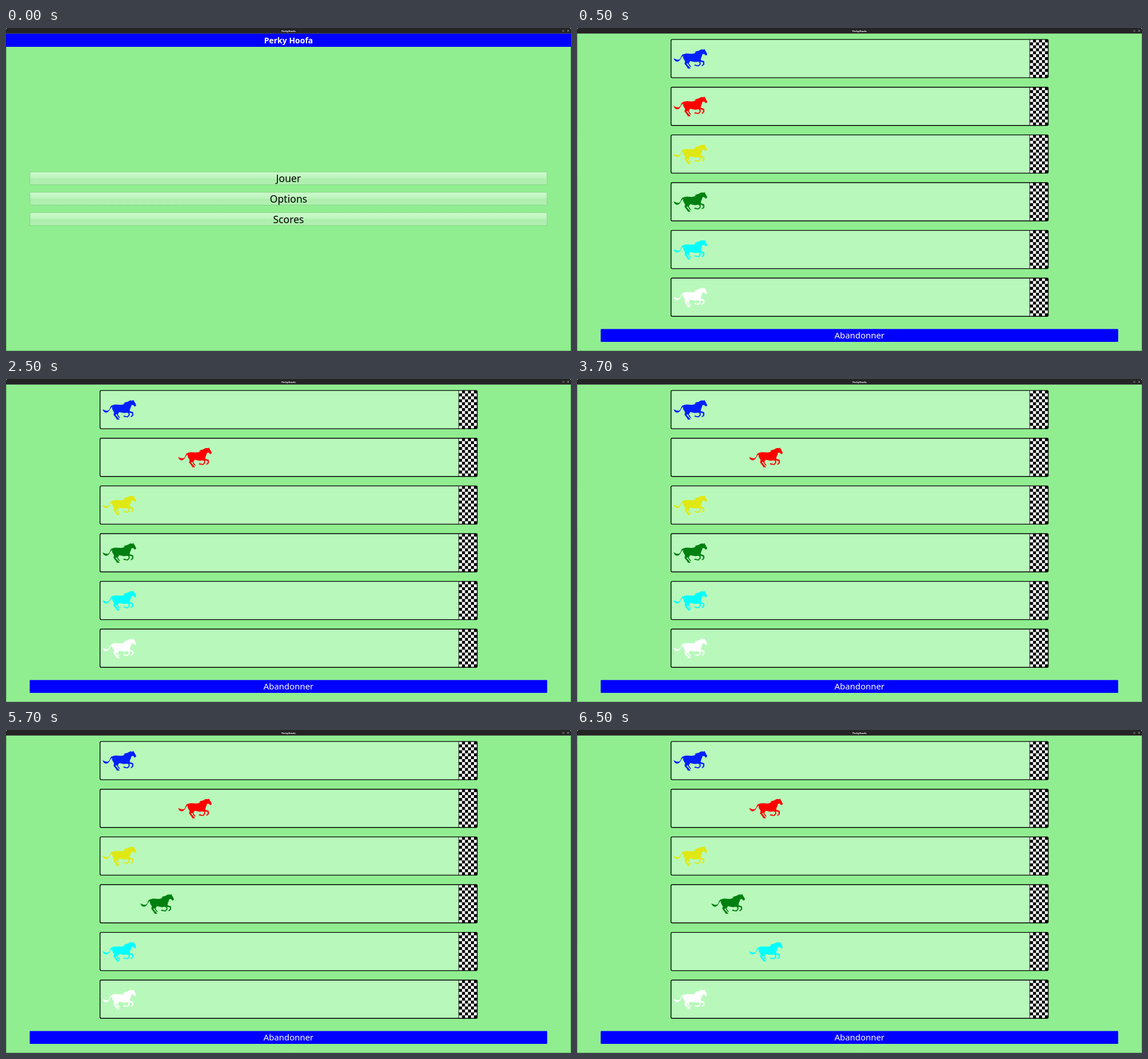
Animation of 989x566 px, one loop 8 s. Source, as an HTML page with a canvas:

```html
<!DOCTYPE html>
<html lang="fr">
<head>
<meta charset="utf-8">
<title>PerkyHoofa</title>
<style>
html, body { margin: 0; width: 100%; height: 100%; overflow: hidden; background: #90ee90; }
canvas { display: block; width: 989px; height: 566px; }
</style>
</head>
<body>
<canvas id="stage"></canvas>
<script>
const W = 989, H = 566, LOOP = 8000, RACE_START = 500;
const LANE_GAP = 83.62, STEP = 66.1;
const canvas = document.getElementById('stage');
const ctx = canvas.getContext('2d');
const dpr = window.devicePixelRatio || 1;
canvas.width = W * dpr;
canvas.height = H * dpr;

const horses = [
  { color: '#0020ff' },
  { color: '#ff0000', at: 2500, steps: 2 },
  { color: '#dfe813' },
  { color: '#008010', at: 4500, steps: 1 },
  { color: '#00ffff', at: 6500, steps: 2 },
  { color: '#ffffff' }
];

const horse = new Path2D(
  // tail, rump and hind legs
  'M18 9.5C13 10 13.5 15 11 18C8.500 20.500 4 19 0 16.700C1 21.500 5 23.800 8.500 22' +
  'C12.500 20 13 14.500 16.500 12.500C16 17 18.500 19.500 20 22L19 26.500L23 31.500L25 35' +
  'L30 34.600L27.500 32.300L22.500 26.500L24.500 25.500L28 31.200L31 32L28.500 29L26.500 25.500L29 21.800' +
  // belly and forelegs
  'C34 23 38 24 42 22.800L45 23.500L45.500 26.500L43 29.200L37 27.800L36 29.600L40 30.500L44 31L47.500 27' +
  'L47 22.700L51.500 24L51.500 27L48.500 30L50.500 30.500L53.800 27.500L53.500 22L47.500 20' +
  // chest, head, mane and back
  'C47.500 16 49.500 14 50.500 9.500L53.500 9.300L56 12L58.500 10.800L58.300 8.300L55.500 3.500L54 .5L52.500 1.500' +
  'L48 1.200L43.500 3.800L39.500 4.600L36.500 6.200L39 6.500L35.500 8.500C29 10 24 7 18 9.500Z'
);

function label(text, y, size, color, weight = 400) {
  ctx.font = `${weight} ${size}px "Noto Sans", "Open Sans", sans-serif`;
  ctx.textAlign = 'center';
  ctx.fillStyle = color;
  ctx.fillText(text, W / 2, y);
}

function box(x, y, w, h, r, fill, stroke, line = 1) {
  ctx.beginPath();
  ctx.roundRect(x, y, w, h, r);
  ctx.fillStyle = fill;
  ctx.fill();
  if (!stroke) return;
  ctx.strokeStyle = stroke;
  ctx.lineWidth = line;
  ctx.stroke();
}

function drawWindow() {
  ctx.fillStyle = '#fff';
  ctx.fillRect(0, 0, W, 10);
  ctx.fillStyle = '#90ee90';
  ctx.fillRect(0, 9.6, W, H);
  box(0, 0, W, 9.7, [2.5, 2.5, 0, 0], '#242424');
  label('PerkyHoofa', 6.5, 4.2, '#fff', 700);
  for (const x of [975.5, 984]) {
    ctx.beginPath();
    ctx.arc(x, 4.9, 2.2, 0, 7);
    ctx.fillStyle = '#444';
    ctx.fill();
  }
  ctx.fillStyle = '#bbb';
  ctx.fillRect(974.7, 5.2, 1.6, 0.6);
  ctx.strokeStyle = '#ddd';
  ctx.lineWidth = 0.5;
  ctx.beginPath();
  ctx.moveTo(983.2, 4.1);
  ctx.lineTo(984.8, 5.7);
  ctx.moveTo(984.8, 4.1);
  ctx.lineTo(983.2, 5.7);
  ctx.stroke();
  ctx.strokeStyle = '#5fa05f';
  ctx.lineWidth = 0.8;
  ctx.beginPath();
  ctx.moveTo(0.4, 10);
  ctx.lineTo(0.4, H - 0.4);
  ctx.lineTo(W - 0.4, H - 0.4);
  ctx.lineTo(W - 0.4, 10);
  ctx.stroke();
}

function menuButton(text, i) {
  const y = 252.3 + i * 35.7;
  const shade = ctx.createLinearGradient(0, y, 0, y + 22.5);
  shade.addColorStop(0, '#d0fcd0');
  shade.addColorStop(0.5, '#b9f3b9');
  shade.addColorStop(0.52, '#aeedae');
  shade.addColorStop(1, '#b0f0b0');
  box(41.9, y, 905.2, 22.4, 1, shade, '#80cc80', 0.8);
  label(text, y + 17.9, 17.6, '#000');
}

function drawMenu() {
  ctx.fillStyle = '#00f';
  ctx.fillRect(0, 9.8, W, 23.2);
  label('Perky Hoofa', 27, 14, '#fff', 700);
  ['Jouer', 'Options', 'Scores'].forEach(menuButton);
}

function drawFinish(x, y, w, h) {
  const cols = 6, rows = 13, cw = w / cols, ch = h / rows;
  ctx.fillStyle = '#fff';
  ctx.fillRect(x, y, w, h);
  ctx.fillStyle = '#000';
  for (let r = 0; r < rows; r++)
    for (let c = 0; c < cols; c++)
      if ((r + c) % 2) ctx.fillRect(x + c * cw, y + r * ch, cw, ch);
  ctx.fillRect(x - 0.8, y, 0.9, h);
}

function drawRace(t) {
  horses.forEach(({ color, at = Infinity, steps }, i) => {
    const y = 20.1 + i * LANE_GAP;
    box(164.6, y, 660.2, 67, 2, '#b8f9bb');
    drawFinish(793, y, 31.4, 67);
    ctx.beginPath();
    ctx.roundRect(164.6, y, 660.2, 67, 2);
    ctx.strokeStyle = '#000';
    ctx.lineWidth = 1.4;
    ctx.stroke();
    ctx.save();
    ctx.translate(169.2 + (t >= at ? steps * STEP : 0), y + 16.1);
    ctx.fillStyle = color;
    ctx.fill(horse);
    ctx.restore();
  });
  box(41.5, 527.4, 905.8, 22.7, 1, '#00f');
  label('Abandonner', 544.4, 14.9, '#fff');
}

function draw(t) {
  ctx.setTransform(dpr, 0, 0, dpr, 0, 0);
  drawWindow();
  if (t < RACE_START) drawMenu();
  else drawRace(t);
}

const start = performance.now();
function tick() {
  draw((performance.now() - start) % LOOP);
  requestAnimationFrame(tick);
}
tick();
</script>
</body>
</html>
```
